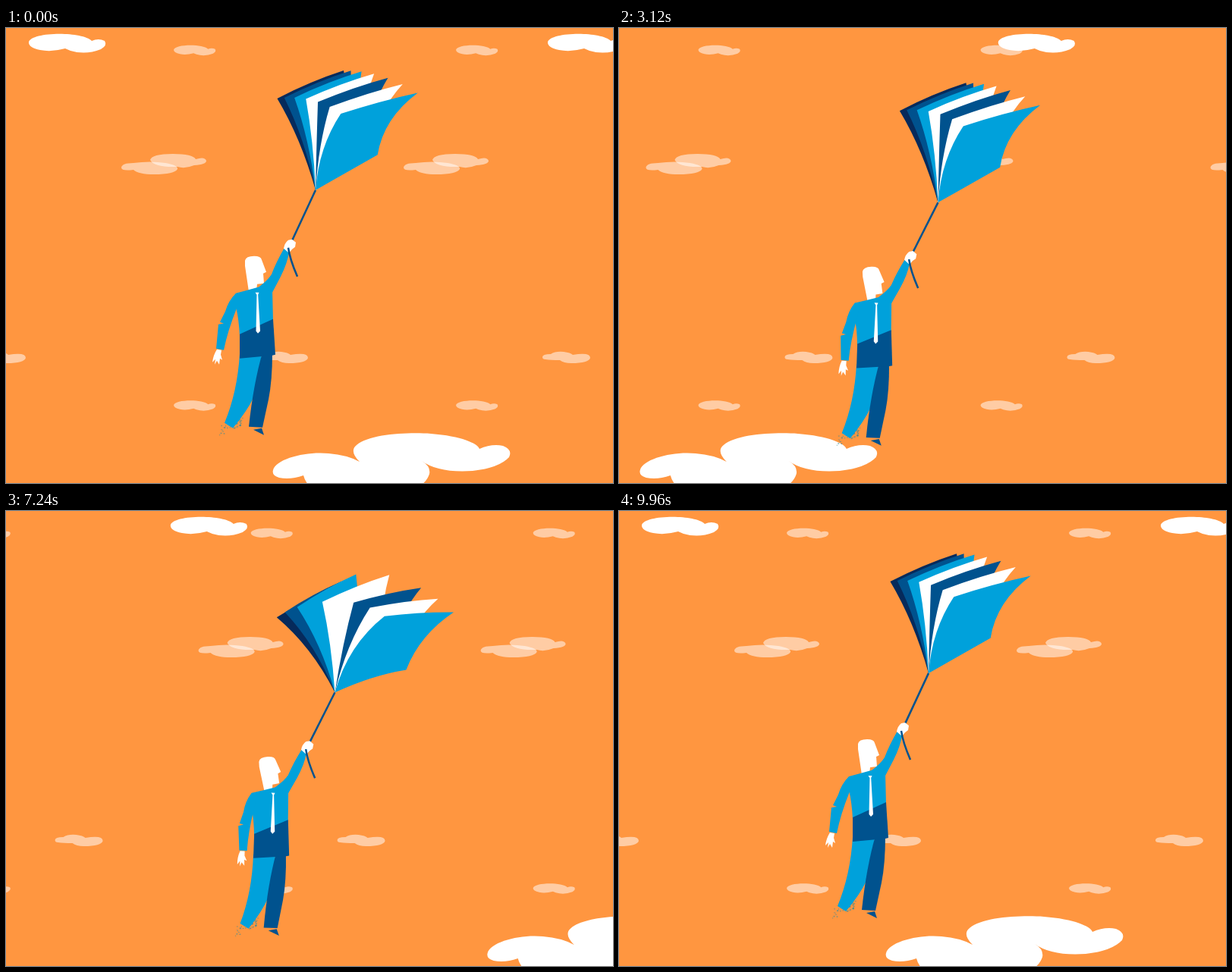
An HTML page with a canvas for the animation above (10 s loop, 800 by 600 pixels).

```html
<!DOCTYPE html>
<html lang="en">
<head>
<meta charset="utf-8">
<title>Flying with a book</title>
<style>
html, body { margin: 0; width: 100%; height: 100%; overflow: hidden; background: #ff9640; }
canvas { display: block; width: 800px; height: 600px; }
</style>
</head>
<body>
<canvas id="stage" width="800" height="600"></canvas>
<script>
const ctx = document.getElementById('stage').getContext('2d');
const LOOP = 10000, STEP = 40, LAST = LOOP - STEP;
const SKY = '#ff9640', CYAN = '#00a1db', BLUE = '#00528e', NAVY = '#062a5b', WHITE = '#fff', HAZE = 'rgba(255,255,255,.52)';
const rad = d => d * Math.PI / 180;
const smooth = u => { u = Math.min(1, Math.max(0, u)); return u * u * (3 - 2 * u); };
// Degrees clockwise from straight up
const polar = (deg, r) => [r * Math.sin(rad(deg)), -r * Math.cos(rad(deg))];
const turn = (x, y, d) => {
  const c = Math.cos(rad(d)), s = Math.sin(rad(d));
  return [x * c - y * s, x * s + y * c];
};

// Clouds
const puff = new Path2D('M30 19C32 5 100 4 113 17Q122 13 130 17Q134 23 125 28Q105 36 85 30L78 27Q60 32 45 29Q30 26 30 19Z');
const bank = new Path2D('M352 583C356 568 395 558 425 561Q450 563 466 572Q452 558 462 550C480 535 530 533 560 535C600 538 622 548 624 555Q640 548 655 551Q668 556 663 566Q650 580 615 584Q570 587 548 571Q560 578 558 588Q555 598 545 604L400 604Q394 598 392 590Q375 596 360 593Q350 590 352 583Z');
const wisp = new Path2D('M707 434Q707 430 718 430Q724 426 735 427Q744 428 747 431Q770 427 770 435Q768 442 745 442Q735 442 730 438Q718 438 711 437Q707 437 707 434Z');
const low = new Path2D('M152 184Q153 178 168 178Q190 175 210 178Q227 181 226 186Q222 193 195 193Q175 193 168 187Q152 189 152 184Z');
const high = new Path2D('M190 174Q192 166 220 166Q246 166 250 173Q262 169 264 175Q264 180 248 181Q236 186 226 183Q195 184 190 174Z');

function drift(path, color, gap, t, dx = 0, dy = 0, size = 1) {
  ctx.fillStyle = color;
  for (let i = -2; i < 4; i++) {
    ctx.save();
    ctx.translate(dx + i * gap - gap * t / LAST, dy);
    ctx.scale(size, size);
    ctx.fill(path);
    ctx.restore();
  }
}

function clouds(t) {
  for (const y of [18.5, 487]) drift(puff, HAZE, 372, t, 204.7, y, .545);
  for (const path of [low, high, wisp]) drift(path, HAZE, 372, t);
  drift(puff, WHITE, 684, t);
  drift(bank, WHITE, 1035, t);
}

// Key poses of the slow swing: time, x, y, body angle, arm angle
const KEYS = [
  [0, 331, 352, 0, 0],
  [1200, 316, 365, 7.5, -9.5],
  [3120, 339, 357, 2, -8],
  [4560, 323, 348, 12.5, -8],
  [7240, 352, 361, 2, -9.5],
  [8920, 338, 365, 7, -20],
  [9960, 331, 355, 0, 0]
];

// Looping cubic through one column of the keys
function swing(col, t) {
  const n = KEYS.length;
  let i = n - 1;
  while (KEYS[i][0] > t) i--;
  const T = k => KEYS[(k + n) % n][0] + LOOP * Math.floor(k / n);
  const V = k => KEYS[(k + n) % n][col];
  const slope = k => (V(k + 1) - V(k - 1)) / (T(k + 1) - T(k - 1));
  const h = T(i + 1) - T(i), u = (t - T(i)) / h, w = 1 - u;
  return w * w * (1 + 2 * u) * V(i) + u * u * (3 - 2 * u) * V(i + 1) +
    u * w * h * (w * slope(i) - u * slope(i + 1));
}

// Book: pages fan around the spine at (0,0), s = 0 closed to 1 open
const PAGES = [NAVY, BLUE, CYAN, WHITE, BLUE, WHITE, CYAN];

function page(i, s) {
  const u = (i / 6) ** 1.3, d = i - 3.1, right = d > 0;
  const fan = s * (45 * Math.tanh(1.8 * d) + 9 * d);
  const depth = 1 + .25 * s * Math.min(d, .3);
  const aDeg = -23.4 + 41 * u + fan;
  const aLen = (131 - 25 * u) * (1 + s * d * (right ? .22 : .07));
  const bDeg = 12.5 + 33.2 * u + fan * (right ? .65 : 1);
  const cDeg = bDeg + 14 + (right ? 13 * s * (d - 2) : 0);
  const cLen = (94 + 15 * s) * depth;
  const a = polar(aDeg, aLen), b = polar(bDeg, (162 + 24 * u) * depth), c = polar(cDeg, cLen);

  ctx.fillStyle = PAGES[i];
  ctx.beginPath();
  ctx.moveTo(0, 0);
  ctx.quadraticCurveTo(...polar(aDeg + 7 - 21 * u * u - .25 * fan, aLen * .54), ...a);
  ctx.quadraticCurveTo((a[0] + b[0]) * .515, (a[1] + b[1]) * .515, ...b);
  ctx.quadraticCurveTo(...polar((bDeg + cDeg) / 2 - 2 - 8 * u * (1 - s), (135 - 5 * u + 15 * s) * depth), ...c);
  ctx.quadraticCurveTo(...polar(cDeg - (right ? 12 * s * d : 0), cLen * .55), 0, 0);
  ctx.fill();
}

function book(beat) {
  const s = smooth(beat < .54 ? (beat - .12) / .41 : (.95 - beat) / .39);
  const order = s > .6 ? [0, 1, 2, 3, 6, 5, 4] : [0, 1, 2, 3, 4, 5, 6];
  for (const i of order) page(i, s);
}

// Figure, drawn around the knot of the tie
const KNOT = [331, 350];
const shapes = {
  head: 'M315 307Q316 301 327 301Q336 301 337 306L343 322L339 324L340 337L331 338L330 348L320 348L315 314Z',
  torso: 'M303 350L318 346L336 341L351 345L352 387L308 406Q307 385 303 368Z',
  jacket: 'M308 404L352 384L355 431L351 432Q330 434 308 436Z',
  tie: 'M328.5 349L333.5 349L332.2 352L335 400L332 403L329.5 400L330.5 352Z',
  sleeve: 'M303 350Q293 360 289 374L282 388L287 390L280 391L277 423L287 425Q292 400 304 370L310 352Z',
  palm: 'M278 424L284 425L283 431L285 438L282 436L281 444L278 439L275 444L276 437L272 441Q273 432 278 424Z',
  raised: 'M333 342Q345 333 350 325Q356 309 367 290L373 296Q371 310 362 328L351 349Z',
  fist: 'M366 291Q367 284 372 280L377 279L382 283L381 289L377 292L373 297Z',
  back: 'M308 430L337 428Q336 465 326 488Q318 505 299 528L288 521Q305 480 308 430Z',
  front: 'M338 428L351 428Q351 465 346 490L338 527L320 526Q326 470 338 428Z',
  shoe: 'M326 530L337 528L340 537Z'
};
for (const name in shapes) shapes[name] = new Path2D(shapes[name]);

const paint = (name, color) => { ctx.fillStyle = color; ctx.fill(shapes[name]); };

function pivot(x, y, angle, draw) {
  ctx.save();
  ctx.translate(x, y);
  ctx.rotate(rad(angle));
  ctx.translate(-x, -y);
  draw();
  ctx.restore();
}

// Rough crumbs at the trailing foot
function crumbs() {
  let seed = 7;
  const rnd = () => (seed = seed * 16807 % 2147483647) / 2147483647;
  ctx.fillStyle = 'rgba(60,140,150,.65)';
  for (let i = 0; i < 46; i++) {
    const u = rnd(), v = rnd();
    ctx.fillRect(281 + u * 30, 529 - u * 14 + (v - .3) * 12, .8 + rnd() * 1.6, .8 + rnd());
  }
}

function line(draw) {
  ctx.strokeStyle = BLUE;
  ctx.lineWidth = 2.5;
  ctx.beginPath();
  draw();
  ctx.stroke();
}

function figure(t) {
  const beat = t % 1000 / 1000;
  const x = swing(1, t), body = swing(3, t), arm = swing(4, t);
  const y = swing(2, t) + 12 * Math.sin(2 * Math.PI * (beat - .03));
  const slack = Math.max(arm, -10);
  const reach = turn(43, -63, body), pull = turn(34, -73, body * .9);
  const hand = [x + reach[0], y + reach[1]];
  const spine = [hand[0] + pull[0], hand[1] + pull[1]];

  line(() => { ctx.moveTo(...hand); ctx.lineTo(...spine); });
  ctx.save();
  ctx.translate(...spine);
  ctx.rotate(rad(.7));
  book(beat);
  ctx.restore();

  ctx.save();
  ctx.translate(x - KNOT[0], y - KNOT[1]);
  pivot(...KNOT, .6 * body + .5 * slack, () => paint('head', WHITE));
  pivot(...KNOT, body, () => {
    pivot(320, 434, 2 * body + .8 * slack, () => { crumbs(); paint('back', CYAN); });
    pivot(344, 434, .4 * (body + arm), () => { paint('front', BLUE); paint('shoe', BLUE); });
    paint('torso', CYAN);
    paint('jacket', BLUE);
    paint('raised', CYAN);
    paint('fist', WHITE);
    paint('tie', WHITE);
    pivot(303, 352, arm, () => { paint('palm', WHITE); paint('sleeve', CYAN); });
  });
  ctx.restore();

  line(() => {
    ctx.moveTo(hand[0] - 2, hand[1] + 3);
    ctx.quadraticCurveTo(hand[0], hand[1] + 18, hand[0] + 10, hand[1] + 41);
  });
}

const start = performance.now();
function frame() {
  const t = Math.floor((performance.now() - start) % LOOP / STEP) * STEP;
  ctx.fillStyle = SKY;
  ctx.fillRect(0, 0, 800, 600);
  clouds(t);
  figure(t);
  requestAnimationFrame(frame);
}
frame();
</script>
</body>
</html>
```
